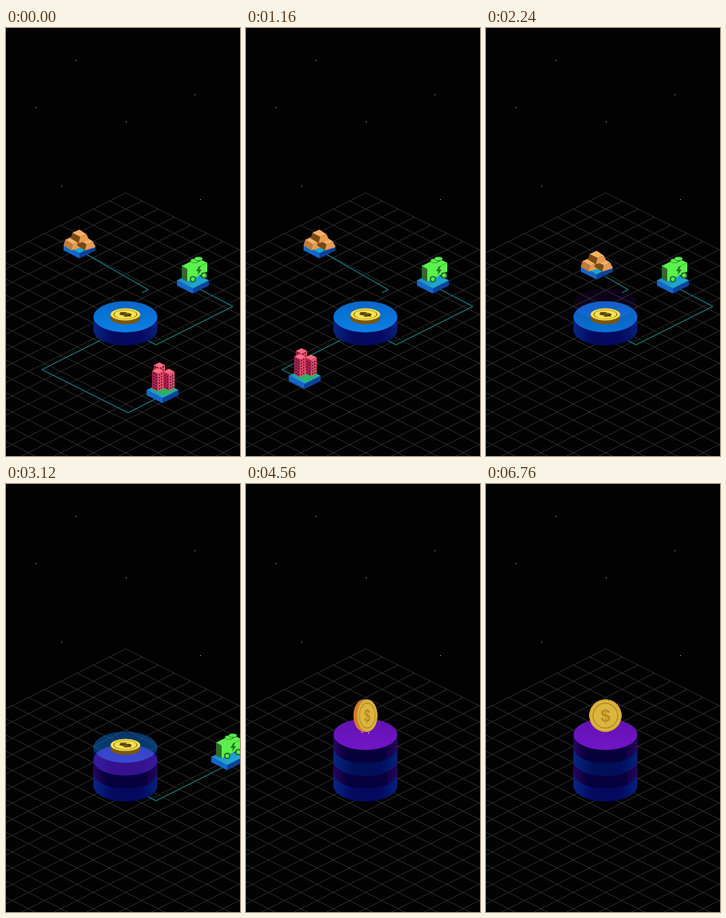
Animation, 293 px wide and 535 px high, one loop 7.08 s. Source, as an HTML page:

```html
<!DOCTYPE html>
<html lang="en">
<head>
<meta charset="utf-8">
<title>Asset stack</title>
<style>
html, body { margin: 0; width: 100%; height: 100%; overflow: hidden; background: #020203; }
svg { display: block; width: 100vw; height: 100vh; }
text { font-family: "Liberation Sans", Arial, sans-serif; font-weight: bold; text-anchor: middle; }
</style>
</head>
<body>
<svg id="stage" viewBox="0 0 293 535">
  <defs>
    <linearGradient id="blueTop" x1="0" y1="0" x2="0" y2="1">
      <stop offset="0" stop-color="#0868c8"/><stop offset="1" stop-color="#0b80e6"/>
    </linearGradient>
    <linearGradient id="violetTop" x1="0" y1="0" x2="0" y2="1">
      <stop offset="0" stop-color="#6212b0"/><stop offset="1" stop-color="#7016c8"/>
    </linearGradient>
    <linearGradient id="blueRim">
      <stop offset="0" stop-color="#0a40a8" stop-opacity=".5"/><stop offset=".3" stop-color="#0a40a8" stop-opacity="0"/>
      <stop offset=".75" stop-color="#0a40a8" stop-opacity="0"/><stop offset="1" stop-color="#0a40a8" stop-opacity=".4"/>
    </linearGradient>
    <linearGradient id="violetRim">
      <stop offset="0" stop-color="#4a0c80" stop-opacity=".5"/><stop offset=".2" stop-color="#4a0c80" stop-opacity="0"/>
      <stop offset=".8" stop-color="#4a0c80" stop-opacity="0"/><stop offset="1" stop-color="#4a0c80" stop-opacity=".5"/>
    </linearGradient>
    <linearGradient id="deck" x1="0" y1="0" x2="1" y2="1">
      <stop offset="0" stop-color="#1678d8"/><stop offset="1" stop-color="#20bccc"/>
    </linearGradient>
  </defs>
  <rect width="293" height="535" fill="#020203"/>
  <g id="stars" fill="#a8a8a8"></g>
  <path id="grid" fill="none" stroke="#363638" stroke-width=".8"/>
  <g id="wires" fill="none" stroke="#109c9c"></g>
  <g id="items"></g>
  <g id="stack"></g>
  <g id="coin"></g>
  <g id="sparks" fill="#d8d0f0"></g>
</svg>
<script>
const LOOP = 7080, STEP = 40, LAST = 6760;
const $ = id => document.getElementById(id);
const clamp = v => Math.max(0, Math.min(1, v));
const ramp = (t, a, b) => clamp((t - a) / (b - a));
const smooth = u => u * u * (3 - 2 * u);
const cubic = u => u < .5 ? 4 * u ** 3 : 1 - 4 * (1 - u) ** 3;
const mix = (a, b, u) => a + (b - a) * u;
const tint = (a, b, u) => `rgb(${a.map((v, i) => Math.round(mix(v, b[i], u)))})`;

function set(node, attrs) {
  for (const k in attrs) node.setAttribute(k, attrs[k]);
}
function el(tag, attrs, parent) {
  const node = document.createElementNS("http://www.w3.org/2000/svg", tag);
  set(node, attrs);
  if (parent) parent.appendChild(node);
  return node;
}

// Backdrop
for (const [x, y] of [[87, 40], [236, 83], [37, 99], [150, 117], [69, 197], [243, 214]])
  el("rect", { x, y, width: 1, height: 1 }, $("stars"));
let mesh = "";
for (let d = 0; d < 560; d += 20.3)
  mesh += `M${150 - d} ${206 + d / 2}l600 300M${150 + d} ${206 + d / 2}l-600 300`;
$("grid").setAttribute("d", mesh);

// Isometric box standing on its front corner (x, y)
function box(g, x, y, l, r, h, [top, left, right]) {
  const face = (d, fill) => el("path", { d: d + "z", fill }, g);
  face(`M${x} ${y}l${-l} ${-l / 2}v${-h}l${l} ${l / 2}`, left);
  face(`M${x} ${y}l${r} ${-r / 2}v${-h}l${-r} ${r / 2}`, right);
  face(`M${x} ${y - h}l${-l} ${-l / 2}l${r} ${-r / 2}l${l} ${l / 2}`, top);
}
function tower(g, x, y, h) {
  box(g, x, y, 7, 7, h, ["#ff6c80", "#b82450", "#f0506a"]);
  for (let up = 3; up < h; up += 3.5)
    for (const c of [-5.5, -2.8, 1.3, 4])
      el("rect", { x: x + c, y: y - up - Math.abs(c + .7) / 2, width: 1.5, height: 2, fill: "#4c1040" }, g);
}
function city(g) {
  box(g, 2, 1, 17, 15, 0, ["#30b060", "none", "none"]);
  tower(g, -4, -27, 7);
  tower(g, 8, -6, 20);
  tower(g, -6, -5, 22);
}
function bar(g, x, y, dark) {
  const face = (d, fill) => el("path", { d: `M${x} ${y}${d}z`, fill }, g);
  face("l-10-6l2-7l10 5", dark);
  face("l13-4l-3-7l-8 3", "#e89a50");
  face("m2-8l-10-5l9-4l9 6", "#fbb060");
}
function bars(g) {
  bar(g, -10, 0, "#c07c38");
  bar(g, 7, 0, "#7a4a14");
  bar(g, -1, -9, "#7a4a14");
}
function car(g) {
  const lime = "#5cf04c", deep = "#1f6a24", paint = [lime, "#2f6a2c", lime];
  box(g, -7, -5, 7, 25, 11, paint);
  box(g, -7, -15, 7, 13, 6, paint);
  for (const x of [0, 14]) {
    el("circle", { cx: x, cy: -8 - x / 3, r: 4, fill: deep }, g);
    el("circle", { cx: x, cy: -8 - x / 3, r: 2.4, fill: lime }, g);
  }
  el("path", { d: "M8 -24l-4 6h3l-1 5l5-7h-3l2-5z", fill: deep }, g);
  for (const x of [2, 7])
    el("ellipse", { cx: x, cy: -30 - x / 2, rx: 5, ry: 2.4, fill: lime, stroke: deep, "stroke-width": .6 }, g);
}

// Polyline with softened corners
function roundPath(pts, reach) {
  let d = "M" + pts[0];
  for (let i = 1; i < pts.length - 1; i++) {
    const c = pts[i];
    const near = p => {
      const f = Math.min(.9, reach / Math.abs(p[0] - c[0]));
      return [mix(c[0], p[0], f), mix(c[1], p[1], f)];
    };
    d += "L" + near(pts[i - 1]) + "Q" + c + " " + near(pts[i + 1]);
  }
  return d + "L" + pts[pts.length - 1];
}
// Length along the path at its closest pass to a point
function closest(path, [x, y]) {
  let best = 0, gap = Infinity;
  for (let s = 0; s <= path.getTotalLength(); s++) {
    const p = path.getPointAtLength(s), d = Math.hypot(p.x - x, p.y - y);
    if (d < gap) [gap, best] = [d, s];
  }
  return best;
}

// times: when each point of the way is reached; trim: share of wire used up on arrival
const items = [
  { art: bars, ease: smooth, trim: 1.15, times: [1740, 2666, 2960], way: [[92, 278], [178, 327], [170, 331]] },
  { art: car, ease: smooth, trim: .55, times: [2400, 3120, 3880, 4000],
    way: [[234, 322], [284, 348], [188, 396], [155, 379.5]] },
  { art: city, ease: cubic, trim: .76, times: [0, 720, 1440, 2160],
    way: [[196, 459], [153, 481], [45, 427], [142, 378.5]] }
];
for (const it of items) {
  it.line = el("path", { d: "M" + it.way.join("L") }, $("wires"));
  it.size = it.line.getTotalLength();
  it.path = el("path", { d: roundPath(it.way, 14) });
  it.marks = it.way.map(p => closest(it.path, p));
  it.end = it.times[it.times.length - 1];
  it.node = el("g", {}, $("items"));
  box(it.node, 0, 10, 20, 20, 6.5, ["url(#deck)", "#1466c8", "#0a429c"]);
  it.art(it.node);
}
function drawItem(it, t) {
  let s = 0;
  for (let i = 1; i < it.times.length; i++)
    s += (it.marks[i] - it.marks[i - 1]) * it.ease(ramp(t, it.times[i - 1], it.times[i]));
  const p = it.path.getPointAtLength(s);
  set(it.node, { transform: `translate(${p.x} ${p.y})`, opacity: 1 - ramp(t, it.end - 100, it.end) });
  const cut = it.size * it.trim * ramp(t, it.times[0], it.end) ** .72;
  set(it.line, { "stroke-dasharray": `0 ${cut} ${it.size} ${it.size}`,
    visibility: t > it.end || cut >= it.size ? "hidden" : "visible" });
}

// Stack of discs
const discs = [
  ["blue", "#050a60", -1000], ["violet", "#07003f", 2222],
  ["blue", "#000f5a", 3040], ["violet", "#07003c", 3952]
].map(([hue, fill, start], i) => {
  const y = 361 - i * 16, g = el("g", {}, $("stack"));
  const d = `M109.5 ${y}v16.5a40 19.5 0 0 0 80 0v-16.5z`;
  el("path", { d, fill }, g);
  el("path", { d, fill: `url(#${hue}Rim)` }, g);
  el("ellipse", { cx: 149.5, cy: y, rx: 40, ry: 19.5, fill: `url(#${hue}Top)` }, g);
  return { g, start };
});

// Coin: lies on the stack, then stands up and spins
const edge = Array.from({ length: 7 }, () => el("ellipse", {}, $("coin")));
const face = el("g", {}, $("coin"));
const plate = el("circle", { r: 20 }, face);
const ring = el("circle", { r: 15.5, fill: "none", "stroke-width": 1.3 }, face);
const rim = el("circle", { r: 19.2, fill: "none", "stroke-width": 1, "stroke-dasharray": "1.5 1" }, face);
const sign = el("text", { y: 7.6, "font-size": 22 }, face);
sign.textContent = "$";

function drawCoin(t) {
  const up = smooth(ramp(t, 3980, 4480));
  const rise = [2240, 2980, 3840].reduce((sum, a) => sum + 16 * smooth(ramp(t, a, a + 150)), 0);
  const half = 3 * smooth(ramp(t, 4270, 5800)) + smooth(ramp(t, 6000, 6760));
  const turn = (half - Math.round(half)) * Math.PI;
  const y = mix(358 - rise, 289.5, up);
  const sx = mix(.925, 1, up) * Math.max(.04, Math.cos(turn));
  const sy = mix(.37, 1, up);
  const dx = -6 * Math.sin(turn) * up, dy = 5 * (1 - up);
  edge.forEach((e, i) => {
    const f = 1 - i / 6 - .5 * up;
    set(e, { cx: 149.5 + dx * f, cy: y + dy * f, rx: 20 * sx, ry: 20 * sy,
      fill: tint([124, 86, 10], [214, 122, 44], up) });
  });
  set(face, { transform: `translate(${149.5 - dx * .5} ${y}) scale(${sx} ${sy})` });
  const ink = tint([84, 60, 8], [184, 134, 38], up);
  plate.setAttribute("fill", tint([244, 226, 80], [218, 182, 60], up));
  ring.setAttribute("stroke", tint([150, 116, 20], [184, 134, 38], up));
  rim.setAttribute("stroke", tint([236, 220, 90], [196, 154, 44], up));
  set(sign, { fill: ink, stroke: ink, "stroke-width": 1.6 * (1 - up), transform: `rotate(${-45 * (1 - up)})` });
}

// Sparks thrown from the foot of the coin
const sparks = [[-37, 7], [34, 14]].map(([dx, dy]) => ({ dx, dy, dot: el("rect", { width: 1.3, height: 1.3 }, $("sparks")) }));
function drawSparks(t) {
  const begin = [4500, 5000, 5340, 6100].find(b => t > b && t < b + 500);
  const u = begin ? (t - begin) / 500 : 1;
  for (const s of sparks) set(s.dot, { x: 149 + s.dx * u, y: 309 + s.dy * u, opacity: 1 - u ** 4 });
}

function draw(t) {
  for (const it of items) drawItem(it, t);
  for (const d of discs) d.g.setAttribute("opacity", ramp(t, d.start, d.start + 160));
  drawCoin(t);
  drawSparks(t);
}

const origin = performance.now();
function tick() {
  const t = (performance.now() - origin) % LOOP;
  draw(Math.min(LAST, Math.floor(t / STEP) * STEP));
  requestAnimationFrame(tick);
}
draw(0);
requestAnimationFrame(tick);
</script>
</body>
</html>
```
